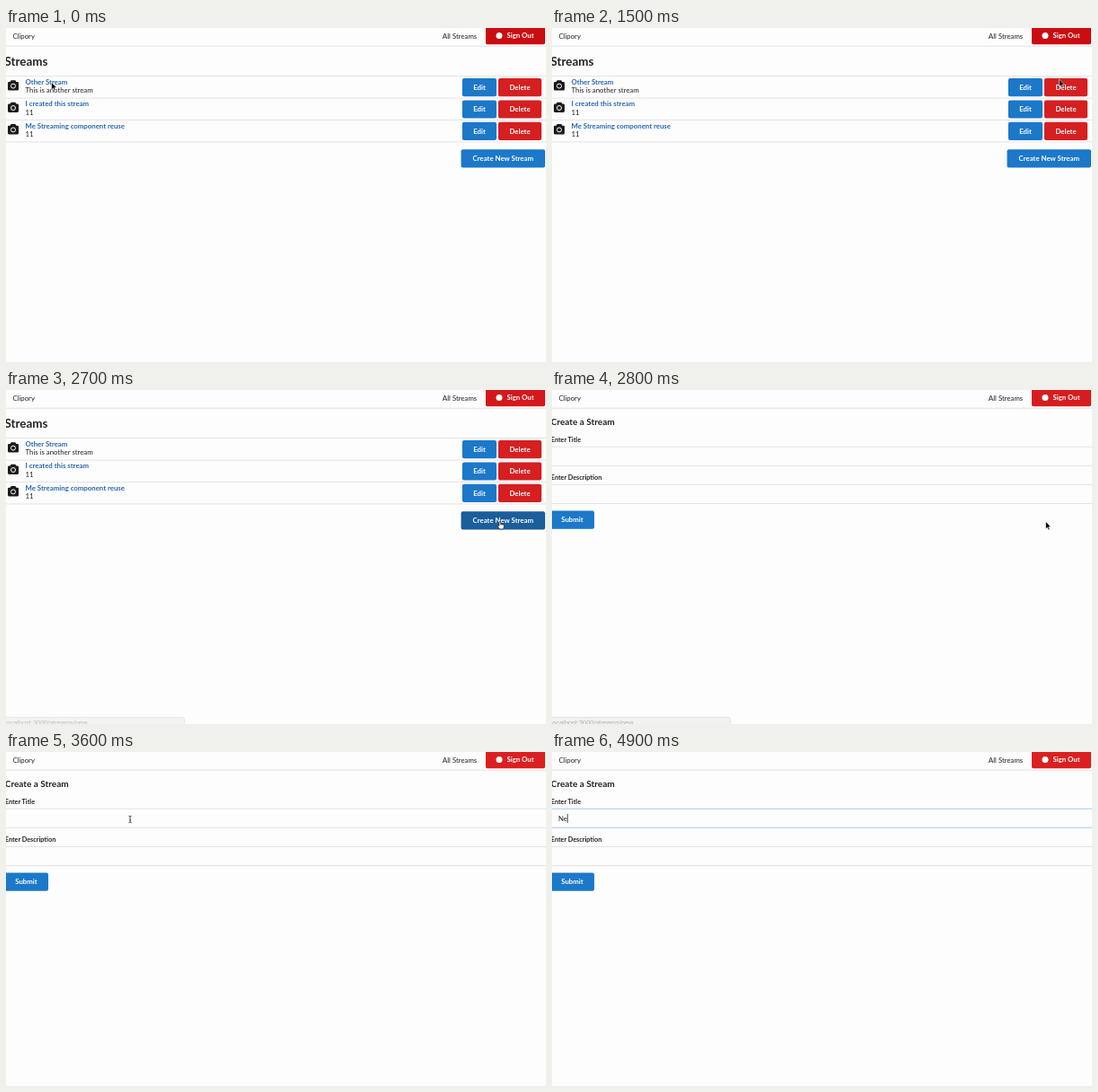
These frames come from a looping animation (600 px wide and 372 px high, 5 s). An HTML page:

```html
<!DOCTYPE html>
<html lang="en">
<head>
<meta charset="utf-8">
<title>Streams</title>
<style>
  html, body { margin: 0; width: 100%; height: 100%; overflow: hidden; background: #fefdfe; }
  svg { display: block; width: 600px; height: 372px; }
  text { font: 7.8px Lato, sans-serif; fill: #222; white-space: pre; }
  .bold { font-weight: 700; }
  .label { font-weight: 700; font-size: 7.24px; }
  .link { font-weight: 700; fill: #2a67ae; }
  .btn { font-weight: 700; fill: #fff; text-anchor: middle; }
  .h2 { font-weight: 700; font-size: 13.4px; }
  .h3 { font-weight: 700; font-size: 10px; }
  .url { font: 7.4px "Liberation Sans", Arial, sans-serif; fill: #999; }
  .rule { stroke: #dedddf; stroke-width: .8; }
</style>
</head>
<body>
<svg viewBox="0 0 600 372">
  <defs>
    <g id="camera" fill="#1b1b1b">
      <path d="M2 61.4Q2 60 3.4 60H4.7L5.6 58.3H10.4L11.3 60H12.7Q14 60 14 61.4V68.2Q14 69.6 12.7 69.6H3.4Q2 69.6 2 68.2Z"/>
      <circle cx="8" cy="64.6" r="2.5" fill="none" stroke="#fefdfe" stroke-width="1"/>
    </g>
  </defs>
  <rect width="600" height="372" fill="#fefdfe"/>
  <g id="list"></g>
  <g id="form"></g>
  <g id="bar"></g>
  <g id="status">
    <path d="M-2 364.6H196Q198.3 364.6 198.3 367V374H-2Z" fill="#f0eff0" stroke="#d0cfd0" stroke-width=".7"/>
    <text class="url" x="-1.3" y="373.2">localhost:3000/streams/new</text>
  </g>
  <g id="mouse">
    <path id="arrow" d="M0 0V8.4L1.9 6.6L3.2 9.5L4.6 8.9L3.3 6.1H5.9Z" fill="#000" stroke="#fff" stroke-width=".6"/>
    <path id="hand" d="M-.6 .3Q.4 -.7 1.2 .4V3.1L4 3.6Q5 3.9 4.9 5L4.3 8.4H.1L-2.3 5.2Q-2.6 4.1-1.5 4.2L-.6 5Z" fill="#fff" stroke="#111" stroke-width=".7"/>
    <path id="beam" d="M-1.6 -3.8Q0 -3.8 0 -2.8Q0 -3.8 1.6 -3.8M0 -2.8V2.8M-1.6 3.8Q0 3.8 0 2.8Q0 3.8 1.6 3.8M-.9 .9H.9" fill="none" stroke="#222" stroke-width=".8"/>
  </g>
</svg>
<script>
const LOOP = 5000, STEP = 100;
const BLUE = '#1c78c8', RED = '#d51f21';
const $ = id => document.getElementById(id);
const set = (id, attrs) => Object.entries(attrs).forEach(([k, v]) => $(id).setAttribute(k, v));
const show = (id, on) => $(id).setAttribute('display', on ? 'inline' : 'none');

const text = (cls, x, y, s, id = '') => `<text id="${id}" class="${cls}" x="${x}" y="${y}">${s}</text>`;
const rule = y => `<path class="rule" d="M0 ${y}H600"/>`;
const button = (x, y, w, h, fill, s, id = '') =>
  `<rect id="${id}" x="${x}" y="${y}" width="${w}" height="${h}" rx="2" fill="${fill}"/>` +
  text('btn', x + w / 2, y + h / 2 + 2.7, s);
const field = (y, id) =>
  `<rect id="${id}" x="-3" y="${y}" width="606" height="21" fill="#fefdfe" stroke="#dedddf" stroke-width=".8"/>`;

const streams = [
  ['Other Stream', 'This is another stream'],
  ['I created this stream', '11'],
  ['Me Streaming component reuse', '11']
];

$('list').innerHTML = text('h2', -1.5, 42.2, 'Streams') + rule(53.6) +
  streams.map(([title, about], i) => `<g transform="translate(0 ${i * 24.4})">` +
    '<use href="#camera"/>' + text('link', 21.5, 63.1, title) + text('', 21.5, 72.4, about) +
    button(507, 56, 38, 20.2, BLUE, 'Edit') + button(547, 56, 48, 20.2, RED, 'Delete') +
    rule(78.1) + '</g>').join('') +
  button(505.6, 135.2, 93.4, 20.2, BLUE, 'Create New Stream', 'create');

$('form').innerHTML = text('h3', -1.2, 38.7, 'Create a Stream') +
  text('label', -1.2, 57.5, 'Enter Title') + field(63.2, 'title') +
  text('label', -1.2, 99.9, 'Enter Description') + field(105.6, 'about') +
  button(-2, 134.6, 49, 20.2, BLUE, 'Submit') +
  text('', 7, 76.8, '', 'typed') +
  '<path id="caret" d="M0 69V79" stroke="#222" stroke-width=".8"/>';

$('bar').innerHTML = rule(20.2) + text('', 7.4, 11.7, 'Clipory') + text('', 485, 11.7, 'All Streams') +
  '<path id="signout" d="M533 0H599V16.5Q599 18.3 597.2 18.3H534.8Q533 18.3 533 16.5Z"/>' +
  '<circle cx="548" cy="8.5" r="3.5" fill="#fff"/>' + text('btn', 571.5, 11.3, 'Sign Out');

// time, x, y of the pointer
const path = [
  [0, 50.5, 60.5], [300, 50.5, 60.5], [600, 62, 108], [1100, 523, 64], [1400, 563.5, 57],
  [1600, 563.5, 57], [1900, 566, 112], [2200, 547, 146], [2400, 547, 146], [2600, 548.5, 146.5],
  [2800, 548.5, 146.5], [3100, 345, 150], [3500, 138, 75], [LOOP, 138, 75]
];
const ramp = (t, a, b) => Math.min(1, Math.max(0, (t - a) / (b - a)));
const mix = (a, b, k) => `rgb(${a.map((v, i) => Math.round(v + (b[i] - v) * k))})`;

function pointer(t) {
  const i = path.findIndex(p => p[0] > t);
  const [a, x, y] = path[i - 1], [b, nx, ny] = path[i];
  const k = ramp(t, a, b), e = k * k * (3 - 2 * k);
  return [x + (nx - x) * e, y + (ny - y) * e];
}

function draw(t) {
  const onForm = t >= 2800, focused = t >= 3800;
  show('list', !onForm);
  show('form', onForm);
  set('signout', { fill: mix([201, 13, 17], [219, 32, 33], ramp(t, 2400, 2900)) });
  set('create', { fill: mix([28, 120, 200], [26, 94, 156], ramp(t, 2300, 2600)) });
  set('title', { stroke: focused ? '#8cc4e8' : '#dedddf' });
  set('status', { opacity: Math.min(.4 + .6 * ramp(t, 2500, 3000), 1 - ramp(t, 3200, 3500)) });
  show('status', t >= 2500 && t < 3500);

  const word = 'Ne'.slice(0, t < 4700 ? 0 : t < 4900 ? 1 : 2);
  $('typed').textContent = word;
  const width = word ? $('typed').getComputedTextLength() : 0;
  set('caret', { transform: `translate(${7.3 + width} 0)` });
  show('caret', focused && (word || (t - 3800) % 1000 < 500));

  const [x, y] = pointer(t);
  const overField = onForm && y > 63 && y < 84;
  const overLink = t >= 2400 && !onForm;
  set('mouse', { transform: `translate(${x} ${y})` });
  show('mouse', !word);
  show('beam', overField);
  show('hand', overLink);
  show('arrow', !overField && !overLink);
}

function tick() {
  draw(Math.floor(performance.now() % LOOP / STEP) * STEP);
  requestAnimationFrame(tick);
}
tick();
</script>
</body>
</html>
```
